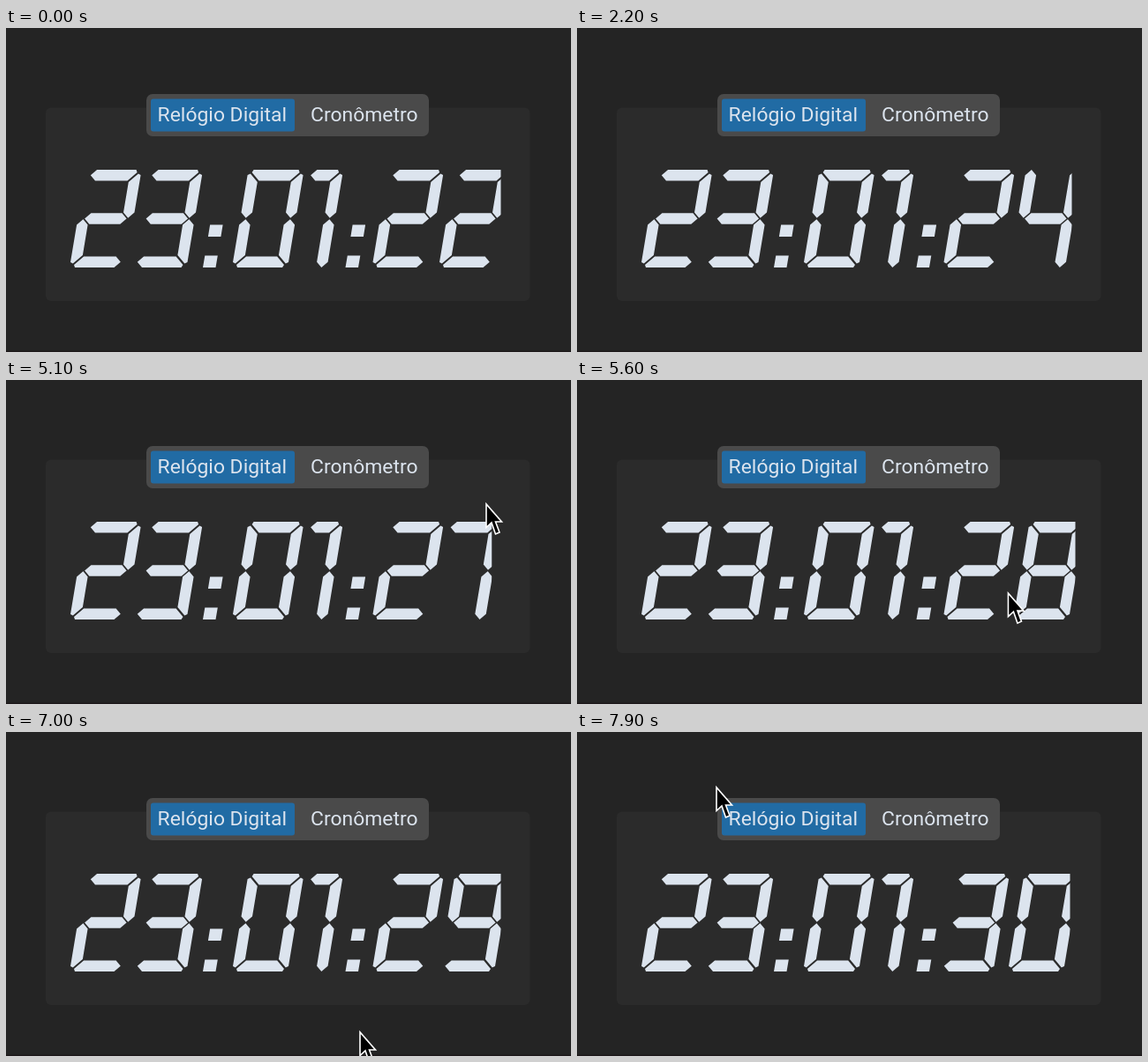
Animation of 640x368 px, one loop 8 s. Source, as an HTML page:

```html
<!DOCTYPE html>
<html lang="pt">
<head>
<meta charset="utf-8">
<title>Relógio Digital</title>
<style>
  html, body { margin: 0; width: 100%; height: 100%; overflow: hidden; background: #242424; }
  svg { display: block; width: 640px; height: 368px; }
  text { font: 22.9px Roboto, Arial, sans-serif; fill: #dce4ee; }
</style>
</head>
<body>
<svg viewBox="0 0 640 368">
  <defs><clipPath id="label"><rect id="edge" x="60" y="150" width="500" height="130"/></clipPath></defs>
  <rect width="640" height="368" fill="#242424"/>
  <rect y="366.5" width="640" height="1.5" fill="#1d181a"/>
  <rect x="45" y="90.5" width="548.5" height="219.5" rx="6" fill="#2b2b2b"/>
  <rect x="159" y="75" width="320" height="48" rx="7" fill="#4a4a4a"/>
  <rect x="164" y="80.5" width="163" height="37" rx="3" fill="#216ba4"/>
  <text x="171.6" y="106">Relógio Digital</text>
  <text x="345" y="106">Cronômetro</text>
  <path id="digits" fill="#dce4ee" clip-path="url(#label)"/>
  <path id="pointer" d="M1 1V27.5L7 22L11.5 35L16 33L11.5 21H18.5Z" fill="#000" stroke="#fff" stroke-width="1.6"/>
</svg>
<script>
const LOOP = 8000, STEP = 100;
const TOP = 161, W = 63, H = 111, MID = H / 2;   // upright digit box
const T = 12.5, GAP = 1.5, CHAMFER = 6;          // bar thickness, gap, corner cut
const SLANT = 0.168, ADVANCE = 75.5, CLIP = 70.5;
const $ = id => document.getElementById(id);

// Bar ends as [distance along the bar, depth from its outer edge].
const joined = [[T + GAP, T], [CHAMFER / 2 + GAP, CHAMFER / 2], [CHAMFER, 0]];
const pointed = at => [[at + T / 2, T], [at, T / 2], [at + T / 2, 0]];
const bar = (length, start, end) =>
  [...start, ...end.map(([s, d]) => [length - s, d]).reverse()];

const slanted = (points, x) => 'M' + points.map(([u, v]) =>
  `${(x + u + SLANT * (H - v)).toFixed(1)} ${(TOP + v).toFixed(1)}`).join('L') + 'Z';

const SEGMENTS = ['abcdef', 'abc', 'abged', 'abgcd', 'fgbc',
  'afgcd', 'afgedc', 'abc', 'abcdefg', 'abcdfg'];
const tipOf = digit => digit === 1 ? 27 : T / 2;

// A bar end is mitred where its neighbour is lit and pointed where it is not.
function glyph(digit, x) {
  const lit = key => SEGMENTS[digit].includes(key);
  const across = (left, right) => bar(W,
    lit(left) ? joined : pointed(tipOf(digit)), lit(right) ? joined : pointed(T / 2));
  const upright = cap => bar(MID, lit(cap) ? joined : pointed(0), pointed(GAP / 2));
  const shapes = {
    a: () => across('f', 'b'),
    d: () => across('e', 'c').map(([s, d]) => [s, H - d]),
    g: () => bar(W, pointed(T / 2 + GAP), pointed(T / 2 + GAP)).map(([s, d]) => [s, MID - T / 2 + d]),
    f: () => upright('a').map(([s, d]) => [d, s]),
    b: () => upright('a').map(([s, d]) => [W - d, s]),
    e: () => upright('d').map(([s, d]) => [d, H - s]),
    c: () => upright('d').map(([s, d]) => [W - d, H - s])
  };
  return [...SEGMENTS[digit]].map(key => slanted(shapes[key](), x)).join('');
}

// Digits without ink on the left are set closer.
function bearing(digit) {
  const has = key => SEGMENTS[digit].includes(key);
  if (has('e') && has('f')) return 4;
  if (has('e') || has('f')) return 0;
  return has('g') ? -6 : -4 - tipOf(digit);
}

function pair(value, pen) {
  const [tens, units] = [Math.floor(value / 10), value % 10];
  const x = pen + bearing(tens);
  const last = x + ADVANCE + bearing(units);
  return { path: glyph(tens, x) + glyph(units, last), last };
}

const dot = (x, v) => slanted([[0, v], [14.5, v], [14.5, v + 13.5], [0, v + 13.5]], x);
const colon = x => dot(x, 62.5) + dot(x, H - 13.5);
const HOURS_MINUTES = pair(23, 72).path + colon(223) + pair(1, 252).path + colon(384.5);

function drawClock(t) {
  const elapsed = t < 1300 ? 0 : Math.floor((t + 700) / 1000);
  const seconds = pair(22 + elapsed, 414.5);
  $('digits').setAttribute('d', HOURS_MINUTES + seconds.path);
  $('edge').setAttribute('width', seconds.last + CLIP - 60);
}

const STROKES = [
  { start: 5100, arrive: 6000, end: 6700, from: [543, 140], to: [443, 322] },
  { start: 7000, arrive: 7300, end: 7600, from: [400, 340], to: [161, 340] },
  { start: 7800, arrive: 7900, end: LOOP, from: [32, 91], to: [157, 62] }
];

function drawPointer(t) {
  const stroke = STROKES.find(s => t >= s.start && t < s.end);
  $('pointer').style.display = stroke ? '' : 'none';
  if (!stroke) return;
  const { start, arrive, from, to } = stroke;
  const k = Math.min(1, (t - start) / (arrive - start));
  const [x, y] = from.map((p, i) => p + (to[i] - p) * k);
  $('pointer').setAttribute('transform', `translate(${x} ${y})`);
}

let shownAt = -1;
function frame() {
  const t = Math.floor((performance.now() % LOOP) / STEP) * STEP;
  if (t !== shownAt) {
    drawClock(t);
    drawPointer(t);
    shownAt = t;
  }
  requestAnimationFrame(frame);
}
frame();
</script>
</body>
</html>
```
